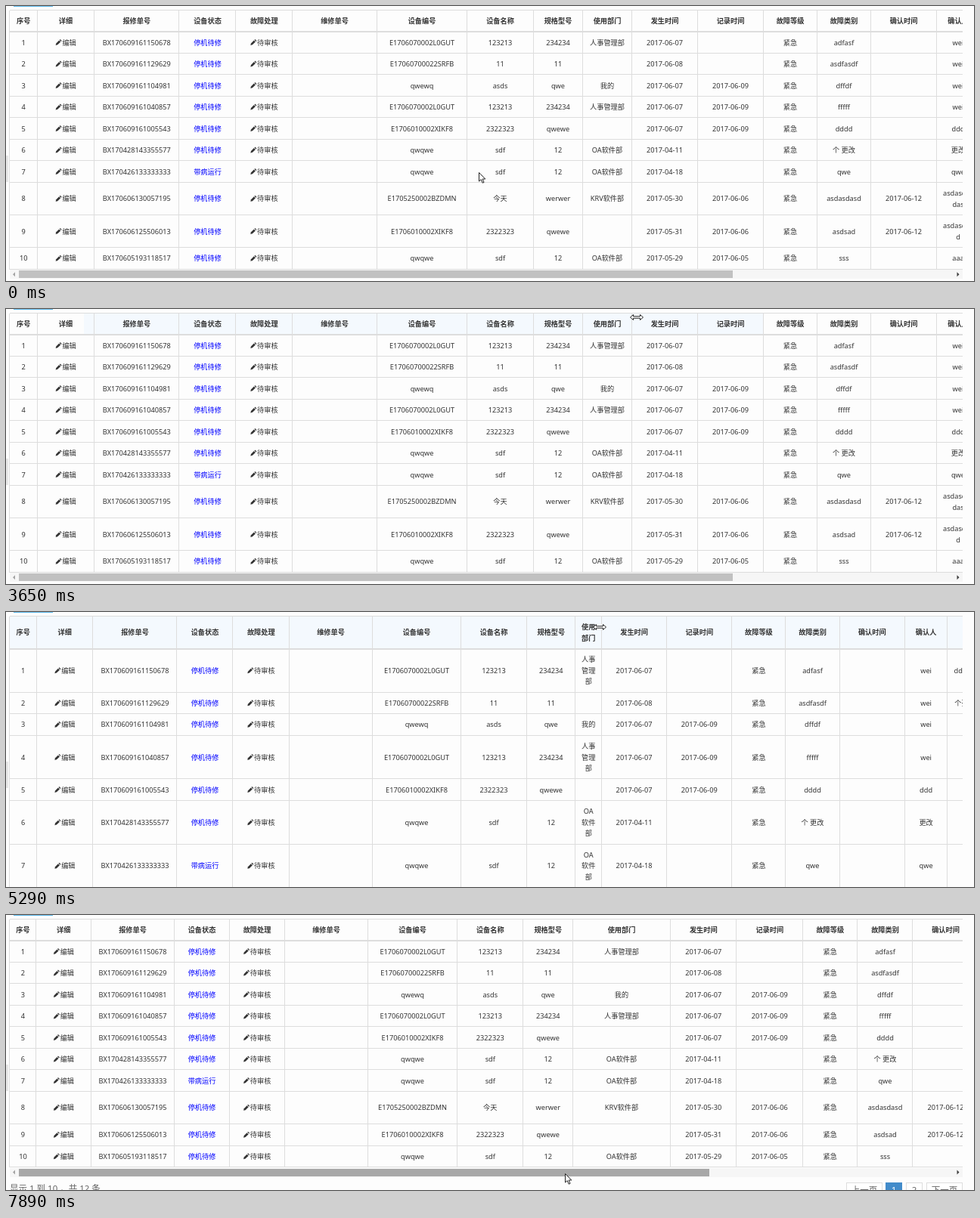
Recreate the animation shown at these times as an HTML page with a canvas. Size 1280 px wide and 364 px high, loop 8000 ms.

```html
<!DOCTYPE html>
<html lang="zh">
<head>
<meta charset="utf-8">
<title>设备报修列表</title>
<style>
html, body { margin: 0; width: 1280px; height: 364px; overflow: hidden; background: #fdfdfd; }
canvas { display: block; }
</style>
</head>
<body>
<canvas id="stage" width="1280" height="364"></canvas>
<script>
const g = document.getElementById('stage').getContext('2d');
const LOOP = 8000, LEFT = 5, RIGHT = 1265, TOP = 5.5, DEPT = 9;
const LINE = 14.6, PAD = 14;
const FAMILY = '"Noto Sans", "Noto Sans CJK SC", "Noto Sans CJK", sans-serif';

const HEADS = '序号,详细,报修单号,设备状态,故障处理,维修单号,设备编号,设备名称,规格型号,使用部门,发生时间,记录时间,故障等级,故障类别,确认时间,确认人,'.split(',');

// order, device, name, model, department, occurred, recorded, category, confirmed, by, remark
const ROWS = [
  'BX170609161150678,E1706070002L0GUT,123213,234234,人事管理部,2017-06-07,,adfasf,,wei,dddddddddd',
  'BX170609161129629,E17060700022SRFB,11,11,,2017-06-08,,asdfasdf,,wei,个列更改改改',
  'BX170609161104981,qwewq,asds,qwe,我的,2017-06-07,2017-06-09,dffdf,,wei,',
  'BX170609161040857,E1706070002L0GUT,123213,234234,人事管理部,2017-06-07,2017-06-09,fffff,,wei,',
  'BX170609161005543,E1706010002XIKF8,2322323,qwewe,,2017-06-07,2017-06-09,dddd,,ddd,',
  'BX170428143355577,qwqwe,sdf,12,OA软件部,2017-04-11,,个 更改,,更改,',
  'BX170426133333333,qwqwe,sdf,12,OA软件部,2017-04-18,,qwe,,qwe,',
  'BX170606130057195,E1705250002BZDMN,今天,werwer,KRV软件部,2017-05-30,2017-06-06,asdasdasd,2017-06-12,asdasdasdas,',
  'BX170606125506013,E1706010002XIKF8,2322323,qwewe,,2017-05-31,2017-06-06,asdsad,2017-06-12,asdasdasd,',
  'BX170605193118517,qwqwe,sdf,12,OA软件部,2017-05-29,2017-06-05,sss,,aaa,'
].map((line, i) => {
  const [order, device, name, model, dept, occurred, recorded, kind, ...rest] = line.split(',');
  return [String(i + 1), '编辑', order, i === 6 ? '带病运行' : '停机待修', '待审核', '',
    device, name, model, dept, occurred, recorded, '紧急', kind, ...rest];
});

// Column widths before, during and after the drag; 0 marks the resized column
const LAYOUTS = [
  { from: 0, tail: 822, widths: [36.5, 75, 112.5, 75, 74.5, 112, 119, 88, 65, 0, 87, 87, 71, 71, 87, 57, 74] },
  { from: 3800, tail: 818, widths: [35.5, 74.5, 111, 74, 74.5, 110, 117, 87, 64.5, 0, 86.2, 86.2, 71, 71.2, 86.3, 56.4, 74] },
  { from: 7160, tail: 828, widths: [35, 72.5, 110, 73, 73, 110, 118, 87.5, 65.5, 0, 87.5, 87.5, 72.5, 73, 87, 62, 74] }
];

// start, end, steps, pointer x, pointer y, dragged border x
const MOVES = [
  [280, 1320, 9, 993, 33, 827.5],
  [1450, 1760, 3, 908, 17, 827.5],
  [2190, 2190, 1, 920, 20, 827.5],
  [2320, 2710, 4, 818, 13, 827.5],
  [2980, 3250, 3, 828, 12, 827.5],
  [3650, 3650, 1, 834, 11, 827.5],
  [3800, 3800, 1, 846, 12, 836],
  [4080, 4080, 1, 856, 13, 850],
  [4360, 4480, 2, 833, 14, 844],
  [4610, 5290, 6, 785, 20, 787.5],
  [5440, 5440, 1, 780, 20, 783],
  [5720, 6150, 4, 818, 18, 812],
  [6580, 6580, 1, 862, 17, 838.5],
  [6730, 6730, 1, 880, 17, 855],
  [7160, 7160, 1, 880, 17, 878.5],
  [7310, 7620, 3, 739, 341, 878.5],
  [7890, 7890, 1, 739, 342, 878.5]
];

function poseAt(t) {
  let pose = [625, 220, 827.5];
  for (const [start, end, steps, ...goal] of MOVES) {
    if (t < start) break;
    const done = t >= end ? 1 : (Math.floor((t - start) / (end - start) * (steps - 1)) + 1) / steps;
    pose = pose.map((v, i) => v + (goal[i] - v) * done);
  }
  return pose;
}

function setFont(size, weight = 400) {
  g.font = `${weight} ${size}px ${FAMILY}`;
}

function box(x, y, w, h, color) {
  g.fillStyle = color;
  g.fillRect(Math.round(x), Math.round(y), Math.round(w), Math.round(h));
}

function text(s, x, y, color = '#333', align = 'center') {
  g.fillStyle = color;
  g.textAlign = align;
  g.fillText(s, x, y);
}

function shape(points, fill, stroke) {
  g.beginPath();
  points.forEach(([x, y]) => g.lineTo(x, y));
  g.closePath();
  if (fill) { g.fillStyle = fill; g.fill(); }
  if (stroke) { g.strokeStyle = stroke; g.lineWidth = 1; g.stroke(); }
}

function at(x, y, draw) {
  g.save();
  g.translate(x, y);
  draw();
  g.restore();
}

function wrap(s, room) {
  const lines = [''];
  for (const ch of s) {
    const last = lines.length - 1;
    if (lines[last] && g.measureText(lines[last] + ch).width > room) lines.push(ch);
    else lines[last] += ch;
  }
  return lines;
}

function pencil(x, y) {
  at(x, y, () => {
    shape([[0, 8], [.7, 5.4], [4.6, 1.5], [6.6, 3.5], [2.6, 7.3]], '#333');
    shape([[5.2, .9], [6.1, 0], [8.1, 2], [7.2, 2.9]], '#333');
  });
}

function drawRow(cells, y, edges, head) {
  setFont(9.2, head ? 700 : 400);
  const wrapped = cells.map((s, c) => wrap(s, edges[c + 1] - edges[c] - PAD));
  const height = 28.5 + LINE * (Math.max(...wrapped.map(l => l.length)) - 1);
  wrapped.forEach((lines, c) => {
    const icon = !head && (c === 1 || c === 4);
    const mid = (edges[c] + edges[c + 1]) / 2 + (icon ? 4.6 : 0);
    const base = y + height / 2 + 3.4 - LINE * (lines.length - 1) / 2;
    lines.forEach((s, i) => text(s, mid, base + i * LINE, !head && c === 3 ? '#00f' : '#333'));
    if (icon) pencil(mid - g.measureText(cells[c]).width / 2 - 8.8, base - 7.6);
  });
  return y + height;
}

function drawTable(t, border, hover) {
  const { widths, tail } = LAYOUTS.filter(l => t >= l.from).pop();
  const edges = [LEFT];
  widths.forEach((w, c) => edges.push(c === DEPT ? border : edges[c] + w));

  g.save();
  g.beginPath();
  g.rect(LEFT - 1, 0, RIGHT - LEFT + 1, 364);
  g.clip();
  if (hover) {
    setFont(9.2, 700);
    const lines = wrap(HEADS[DEPT], edges[DEPT + 1] - edges[DEPT] - PAD).length;
    const [x1, x2] = t < 3800 ? [103, 1001] : [LEFT, RIGHT];
    box(x1, TOP, x2 - x1, 28.5 + LINE * (lines - 1), '#f4f9fe');
  }
  let y = drawRow(HEADS, TOP, edges, true);
  box(LEFT, TOP - .6, RIGHT - LEFT, 1, '#ddd');
  box(LEFT, y - 1, RIGHT - LEFT, 2, '#ddd');
  for (const row of ROWS) {
    y = drawRow(row, y, edges);
    box(LEFT, y - .6, RIGHT - LEFT, 1, '#ddd');
  }
  edges.forEach(x => box(x - .6, TOP, 1, y - TOP, '#ddd'));
  g.restore();

  drawScrollbar(y + 1, 1236 * 1260 / (border + tail), t >= 7620);
  drawPager(y + 20);
}

function drawScrollbar(y, length, hot) {
  box(LEFT, y, RIGHT - LEFT, 12, '#f6f6f6');
  box(17, y + 1, length, 10, hot ? '#a8a8a8' : '#c1c1c1');
  const mid = y + 6;
  shape([[12, mid - 3], [12, mid + 3], [9, mid]], '#a3a3a3');
  shape([[1257.5, mid - 3], [1257.5, mid + 3], [1260.5, mid]], '#404040');
}

function drawPager(y) {
  setFont(11.5);
  text('显示 1 到 10 ，共 12 条', 5, y + 12, '#666', 'left');
  [['上一页', 1111, 48], ['1', 1163, 22], ['2', 1190, 22], ['下一页', 1217, 48]].forEach(([s, x, w]) => {
    const active = s === '1';
    box(x, y, w, 22, active ? '#428bca' : '#ddd');
    if (!active) box(x + 1, y + 1, w - 2, 20, '#fff');
    text(s, x + w / 2, y + 14, active ? '#fff' : '#666');
  });
}

const pointers = {
  arrow() {
    shape([[.5, .5], [.5, 12], [3.2, 9.6], [5.2, 14.2], [7, 13.4], [5.1, 9], [8.8, 9]], '#fff', '#222');
  },
  hand() {
    g.beginPath();
    g.moveTo(-1.5, 11);
    g.lineTo(-1.5, 1.5);
    g.quadraticCurveTo(0, -.5, 1.5, 1.5);
    g.lineTo(1.5, 6);
    g.quadraticCurveTo(3, 5, 4, 6.6);
    g.quadraticCurveTo(5.5, 5.8, 6, 7.4);
    g.quadraticCurveTo(7.8, 7, 7.8, 9);
    g.lineTo(7.5, 13);
    g.lineTo(6, 17);
    g.lineTo(-1, 17);
    g.lineTo(-4.5, 11);
    g.quadraticCurveTo(-4.5, 8, -1.5, 11);
    g.fillStyle = '#fff';
    g.fill();
    g.strokeStyle = '#222';
    g.lineWidth = 1;
    g.stroke();
    [1.5, 4, 6].forEach(x => box(x, 7, 1, 3, '#222'));
  },
  resize() {
    shape([[-8.5, 0], [-4.5, -3.5], [-4.5, -1.2], [4.5, -1.2], [4.5, -3.5], [8.5, 0],
      [4.5, 3.5], [4.5, 1.2], [-4.5, 1.2], [-4.5, 3.5]], '#fff', '#222');
  }
};

function draw(now) {
  const t = now % LOOP;
  const [x, y, border] = poseAt(t);
  const hover = y < 34;
  box(0, 0, 1280, 364, '#fdfdfd');
  box(10, 0, 52, 1, '#5bb8ea');
  box(0, 198, 3, 35, '#e6e6e6');
  drawTable(t, border, hover);
  const kind = !hover ? 'arrow' : t < 3250 ? 'hand' : 'resize';
  at(Math.round(x), Math.round(y), pointers[kind]);
}

const begin = performance.now();
function tick() {
  draw(performance.now() - begin);
  requestAnimationFrame(tick);
}
tick();
</script>
</body>
</html>
```
